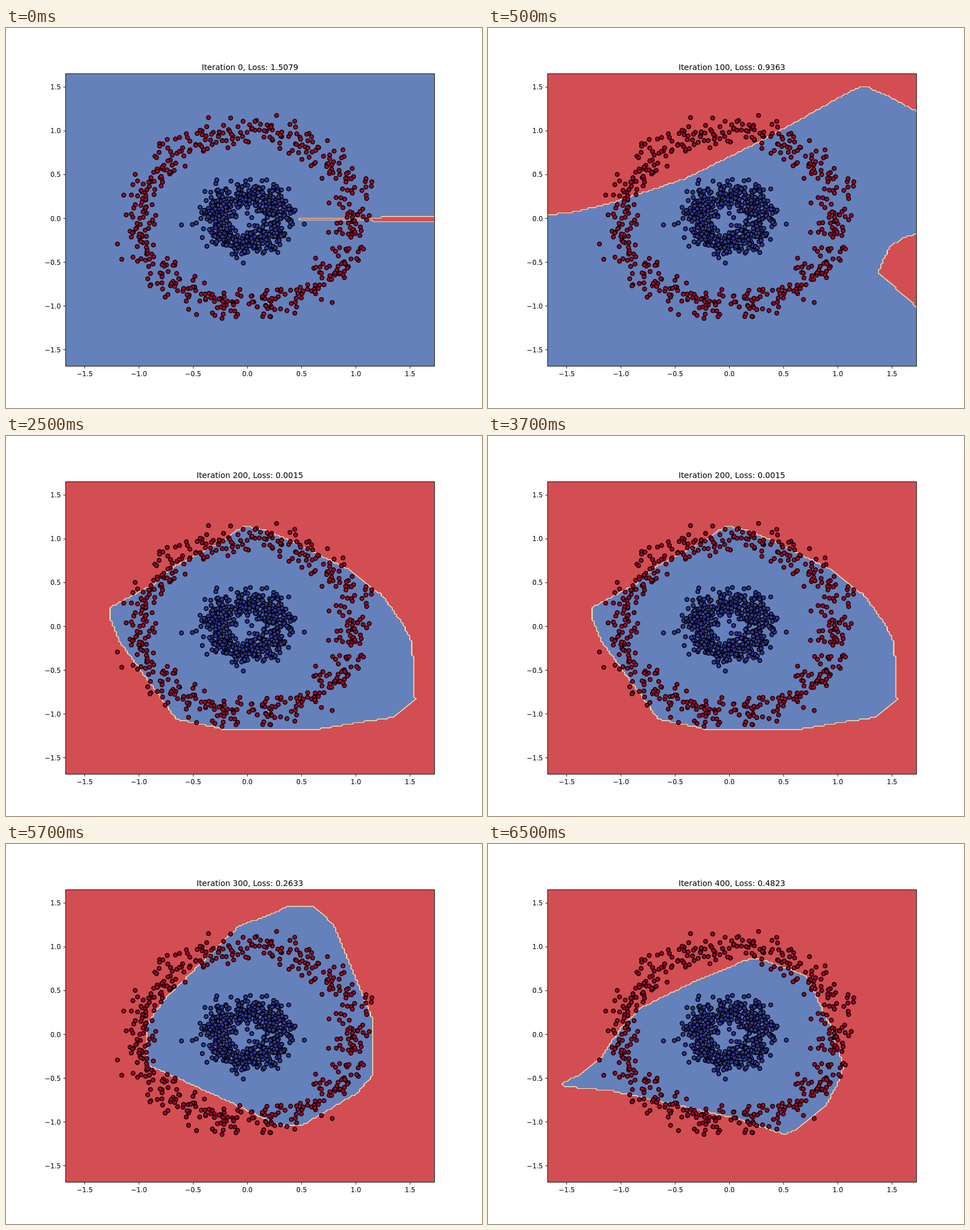
Animation of 837 by 669 pixels, one loop 8000 ms. Source, as an HTML page with a canvas:

```html
<!DOCTYPE html>
<html lang="en">
<head>
<meta charset="utf-8">
<title>Decision boundary during training</title>
<style>
  html, body { margin: 0; width: 100%; height: 100%; overflow: hidden; background: #fff; }
  canvas, svg { position: absolute; left: 0; top: 0; width: 837px; height: 669px; }
  text { font-family: "DejaVu Sans", sans-serif; font-size: 11.62px; }
  #title { font-size: 13.95px; text-anchor: middle; }
  .x { text-anchor: middle; }
  .y { text-anchor: end; }
  .dot { stroke: #000; stroke-width: 1.5; }
  .red { fill: #a50026; }
  .blue { fill: #313695; }
  .axis { fill: none; stroke: #000; stroke-width: .93; }
</style>
</head>
<body>
<canvas id="field" width="837" height="669"></canvas>
<svg id="plot" viewBox="0 0 837 669"></svg>
<script>
const start = performance.now();
const LOOP = 8000;
const BOX = { l: 104.8, t: 80.5, r: 753.5, b: 595.4 };
const COLS = 170, ROWS = 167;
const CW = (BOX.r - BOX.l) / COLS, CH = (BOX.b - BOX.t) / ROWS;
const RED = [211, 78, 82], CREAM = [254, 230, 178], BLUE = [101, 129, 187];
const px = x => 424.5 + 190.67 * x;
const py = y => 335.3 - 154.17 * y;

// Corners of the piecewise linear boundary; "inside" is the class they enclose (0 red, 1 blue).
const STEPS = [
  { at: 0, iteration: 0, loss: 1.5079, inside: 0,
    outline: 'M514,335.8 L648,333.5 760,331.9 760,341.5 640,339.4 514,337Z' },
  { at: 500, iteration: 100, loss: 0.9363, inside: 0,
    outline: 'M98,70 L98,330 150,324 211,310 345,266 450,214 530,172 625,118 655,103 665,103 708,122 760,150 760,70Z'
      + 'M760,361 L735,367 706,385 686,430 760,497Z' },
  { at: 2500, iteration: 200, loss: 0.0015, inside: 1,
    outline: 'M418,158 L445,163 480,175 601,234 661,280 700,334 713,363 717,403 717,457 721,464 682,495'
      + ' 540,517 388,517 300,499 268,455 200,362 183,320 183,302 262,259 290,233 378,187Z' },
  { at: 4500, iteration: 300, loss: 0.2633, inside: 1,
    outline: 'M498,109 L541,109 575,141 612,230 645,308 645,407 618,438 521,495 478,495 400,457'
      + ' 248,388 248,318 278,274 410,144 455,128Z' },
  { at: 6500, iteration: 400, loss: 0.4823, inside: 1,
    outline: 'M129,422 L134,427 215,434 327,458 440,484 520,511 545,501 595,459 622,408 625,391'
      + ' 601,318 560,233 478,201 455,204 363,242 268,289 235,322 200,374 160,407Z' }
];

function seeded(seed) {
  return () => {
    seed = (seed + 0x6d2b79f5) | 0;
    let t = Math.imul(seed ^ (seed >>> 15), seed | 1);
    t ^= t + Math.imul(t ^ (t >>> 7), t | 61);
    return ((t ^ (t >>> 14)) >>> 0) / 4294967296;
  };
}

// Points spread evenly on a circle, moved by Gaussian noise
function ring(radius, colour, random, count = 500, noise = 0.085) {
  let dots = '';
  for (let i = 0; i < count; i++) {
    const a = 2 * Math.PI * (i * 77 % count) / count;
    const r = noise * Math.sqrt(-2 * Math.log(1 - random())), b = 2 * Math.PI * random();
    const x = px(radius * Math.cos(a) + r * Math.cos(b));
    const y = py(radius * Math.sin(a) + r * Math.sin(b));
    dots += `<circle class="dot ${colour}" cx="${x.toFixed(2)}" cy="${y.toFixed(2)}" r="3.49"/>`;
  }
  return dots;
}

function drawPlot() {
  const random = seeded(8);
  let svg = ring(1, 'red', random) + ring(0.3, 'blue', random);
  svg += `<rect class="axis" x="${BOX.l}" y="${BOX.t}" width="${BOX.r - BOX.l}" height="${BOX.b - BOX.t}"/>`;
  for (let v = -1.5; v <= 1.5; v += 0.5) {
    const label = v.toFixed(1).replace('-', '\u2212'), x = px(v), y = py(v);
    svg += `<path class="axis" d="M${x} ${BOX.b}v4.07M${BOX.l} ${y}h-4.07"/>`
      + `<text class="x" x="${x}" y="612.8">${label}</text>`
      + `<text class="y" x="96.5" y="${y + 4.2}">${label}</text>`;
  }
  svg += '<text id="title" x="429" y="73.5"></text>';
  document.getElementById('plot').innerHTML = svg;
}

const ctx = document.getElementById('field').getContext('2d');

// Sample the classes on a coarse grid and interpolate between its nodes, which gives the stepped edge.
function paintField({ inside, outline }) {
  const path = new Path2D(outline);
  const W = COLS + 1, node = new Uint8Array(W * (ROWS + 1));
  for (let j = 0; j <= ROWS; j++)
    for (let i = 0; i <= COLS; i++)
      node[j * W + i] = ctx.isPointInPath(path, BOX.l + i * CW, BOX.b - j * CH) ? inside : 1 - inside;

  const colour = (x, y) => {
    const u = (x - BOX.l) / CW, v = (BOX.b - y) / CH;
    const i = Math.min(COLS - 1, Math.floor(u)), j = Math.min(ROWS - 1, Math.floor(v));
    const k = j * W + i;
    const low = node[k] + (node[k + 1] - node[k]) * (u - i);
    const high = node[k + W] + (node[k + W + 1] - node[k + W]) * (u - i);
    const value = low + (high - low) * (v - j);
    return value < 0.28 ? RED : value < 0.7 ? CREAM : BLUE;
  };

  const img = ctx.createImageData(648, 514);
  for (let y = 0, n = 0; y < img.height; y++)
    for (let x = 0; x < img.width; x++, n += 4) {
      const X = 105 + x, Y = 81 + y;
      const a = colour(X + .25, Y + .25), b = colour(X + .75, Y + .25);
      const c = colour(X + .25, Y + .75), d = colour(X + .75, Y + .75);
      for (let q = 0; q < 3; q++) img.data[n + q] = (a[q] + b[q] + c[q] + d[q]) / 4;
      img.data[n + 3] = 255;
    }
  return img;
}

drawPlot();
const title = document.getElementById('title');
const fields = STEPS.map(paintField);
let shown = -1;

function tick() {
  const t = (performance.now() - start) % LOOP;
  const k = STEPS.filter(s => s.at <= t).length - 1;
  if (k !== shown) {
    shown = k;
    ctx.putImageData(fields[k], 105, 81);
    title.textContent = `Iteration ${STEPS[k].iteration}, Loss: ${STEPS[k].loss}`;
  }
  requestAnimationFrame(tick);
}
tick();
</script>
</body>
</html>
```
